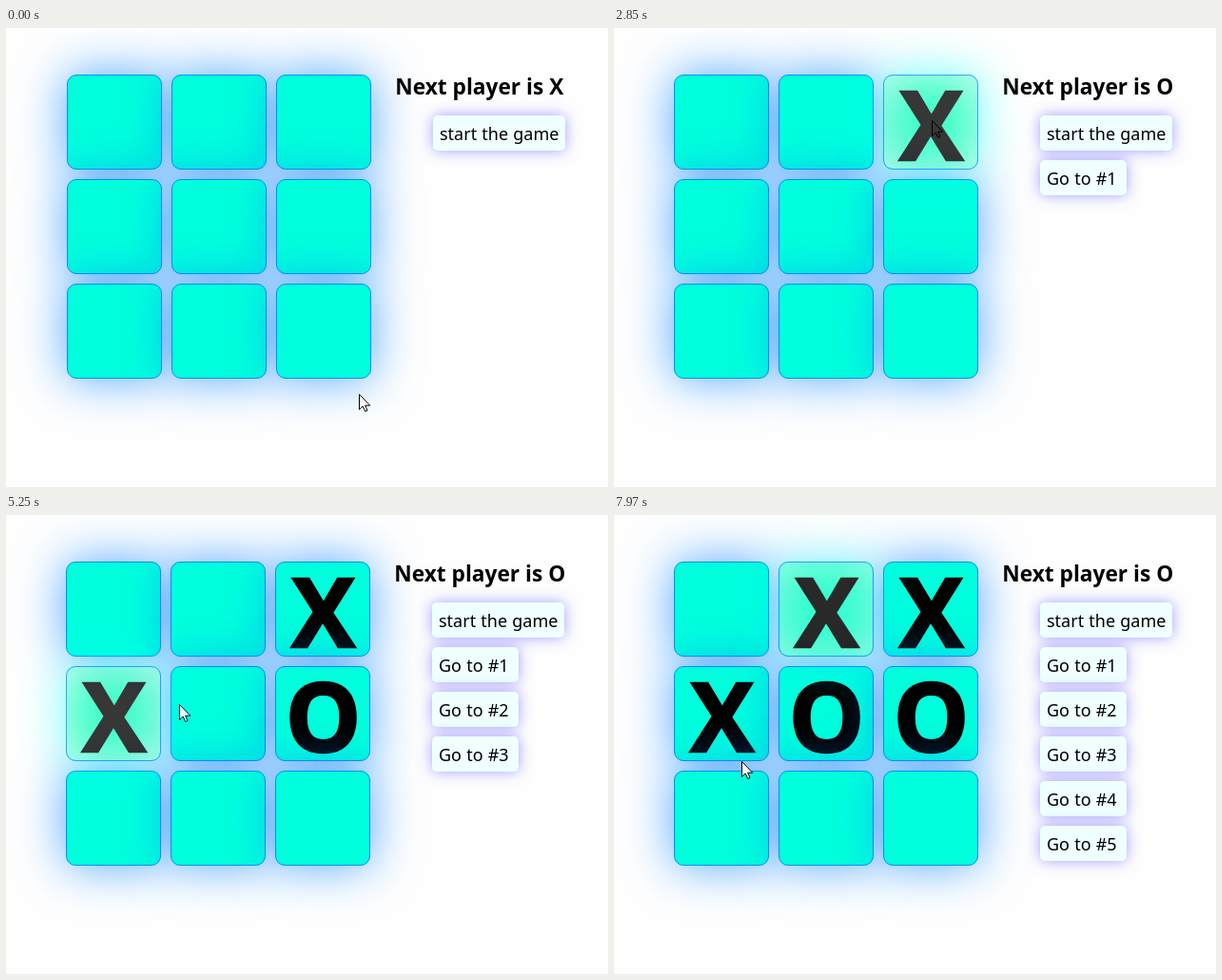
An HTML page for the animation above (8 s loop, 633x483 px).

```html
<!DOCTYPE html>
<html lang="en">
<head>
<meta charset="utf-8">
<title>Tic-tac-toe</title>
<style>
  html, body { margin: 0; width: 100%; height: 100%; overflow: hidden; background: #fefefe; }
  #game, .cell, .mark, .step, h2, #cursor { position: absolute; box-sizing: border-box; }
  #game { left: 0; top: 0; width: 633px; height: 483px; }
  .cell { border: 1px solid rgb(0, 140, 255); border-radius: 10px; }
  .mark {
    left: -19px; right: -20px; top: 0;
    font: bold 100px/100px "Noto Sans", "Open Sans", sans-serif;
    text-align: center; color: #000; -webkit-text-stroke: 2.5px #000;
  }
  h2 {
    left: 409.3px; top: 46px; margin: 0; white-space: nowrap;
    font: bold 22.7px/32px "Open Sans", "Noto Sans", sans-serif; color: #000;
  }
  .step {
    left: 449px; width: 91px; height: 37px; padding-left: 7px; border-radius: 5px;
    font: 18px/38px "Noto Sans", "Open Sans", sans-serif;
    word-spacing: .5px; white-space: nowrap; color: #000;
    background: azure; box-shadow: 0 0 15px rgba(90, 80, 255, .55);
  }
  .step:first-of-type { width: 139px; }
  #cursor { left: 0; top: 0; overflow: visible; }
</style>
</head>
<body>
<div id="game">
  <section id="board"></section>
  <h2 id="status"></h2>
  <section id="steps"></section>
</div>
<svg id="cursor" width="13" height="20">
  <path d="M.5 .5V16.5L4.2 13L6.7 18.5L9 17.5L6.6 12.2H11.7Z" fill="#fff" stroke="#000"/>
</svg>
<script>
const LOOP = 8000, FADE = 300;
const TICK = 77.5, FIRST_TICK = 450; // the screen refreshes in ticks
const LEFT = 64, TOP = 49, SIZE = 100, PITCH = 110;

// Pointer trips: departure, arrival, x, y
const START = [371, 385];
const trips = [
  [450, 990, 230, 183], [1300, 1610, 240, 94], [1610, 1910, 337, 80],
  [2220, 2390, 334, 97], [2850, 3240, 330, 207], [3860, 4020, 132, 192],
  [5100, 5300, 215, 203], [5650, 5790, 227, 215], [6660, 6900, 253, 98],
  [7740, 7885, 134, 259]
];
const clicks = [2390, 3540, 4630, 5800, 7190];

const $ = id => document.getElementById(id);
const clamp = v => Math.max(0, Math.min(1, v));
const mix = (a, b, k) => a + (b - a) * k;
const player = n => "XO"[n % 2];

function add(parent, className, top) {
  const el = document.createElement("div");
  el.className = className;
  el.style.top = top + "px";
  parent.append(el);
  return el;
}

const cells = Array.from({ length: 9 }, (_, i) => {
  const el = add($("board"), "cell", TOP + Math.floor(i / 3) * PITCH);
  el.style.left = LEFT + i % 3 * PITCH + "px";
  el.style.width = el.style.height = SIZE + "px";
  return { el, mark: add(el, "mark", 0) };
});

const steps = Array.from({ length: clicks.length + 1 }, (_, i) => {
  const el = add($("steps"), "step", 92 + 47 * i);
  el.textContent = i ? "Go to #" + i : "start the game";
  return el;
});

function pointerAt(t) {
  let [x, y] = START;
  for (const [from, to, tx, ty] of trips) {
    const k = clamp((t - from) / (to - from)) ** 2;
    x = mix(x, tx, k);
    y = mix(y, ty, k);
  }
  return [Math.round(x), Math.round(y)];
}

function cellAt([x, y]) {
  const dx = x - LEFT, dy = y - TOP;
  const col = Math.floor(dx / PITCH), row = Math.floor(dy / PITCH);
  const inside = col >= 0 && col < 3 && row >= 0 && row < 3
    && dx % PITCH < SIZE && dy % PITCH < SIZE;
  return inside ? row * 3 + col : -1;
}

const moves = clicks.map(t => cellAt(pointerAt(t)));

// Each cell brightens while the pointer is over it and fades afterwards
function glowsAt(t) {
  const glows = Array(9).fill(0);
  for (let u = FIRST_TICK; u < t; u += TICK) {
    const over = cellAt(pointerAt(u));
    glows.forEach((g, i) => glows[i] = clamp(g + (i === over ? 1 : -1) * TICK / FADE));
  }
  return glows;
}

function paintCell({ el }, k) {
  const s = el.style;
  s.zIndex = k > 0 ? 1 : "auto";
  s.opacity = mix(1, .78, k);
  s.backgroundColor = `rgb(0, 255, ${mix(221, 184, k)})`;
  s.boxShadow =
    `0 0 50px rgba(${mix(20, 0, k)}, ${mix(140, 255, k)}, 255, .75), ` +
    `inset 0 0 50px rgba(255, 255, 255, ${.8 * k})`;
}

function render(now) {
  const t = now % LOOP;
  const n = Math.floor((t + 15 - FIRST_TICK) / TICK);
  const ticked = n < 0 ? 0 : FIRST_TICK + n * TICK;

  const played = clicks.filter(c => c <= t).length;
  $("status").textContent = "Next player is " + player(played);
  // the wider O pushes the centred layout left
  $("game").style.left = played % 2 ? "-1px" : "0";
  steps.forEach((el, i) => el.style.display = i <= played ? "block" : "none");

  const glows = glowsAt(ticked);
  cells.forEach((cell, i) => {
    const m = moves.indexOf(i);
    cell.mark.textContent = m >= 0 && m < played ? player(m) : "";
    paintCell(cell, glows[i]);
  });

  const [x, y] = pointerAt(ticked);
  $("cursor").style.transform = `translate(${x}px, ${y}px)`;
}

const start = performance.now();
function frame() {
  render(performance.now() - start);
  requestAnimationFrame(frame);
}
frame();
</script>
</body>
</html>
```
